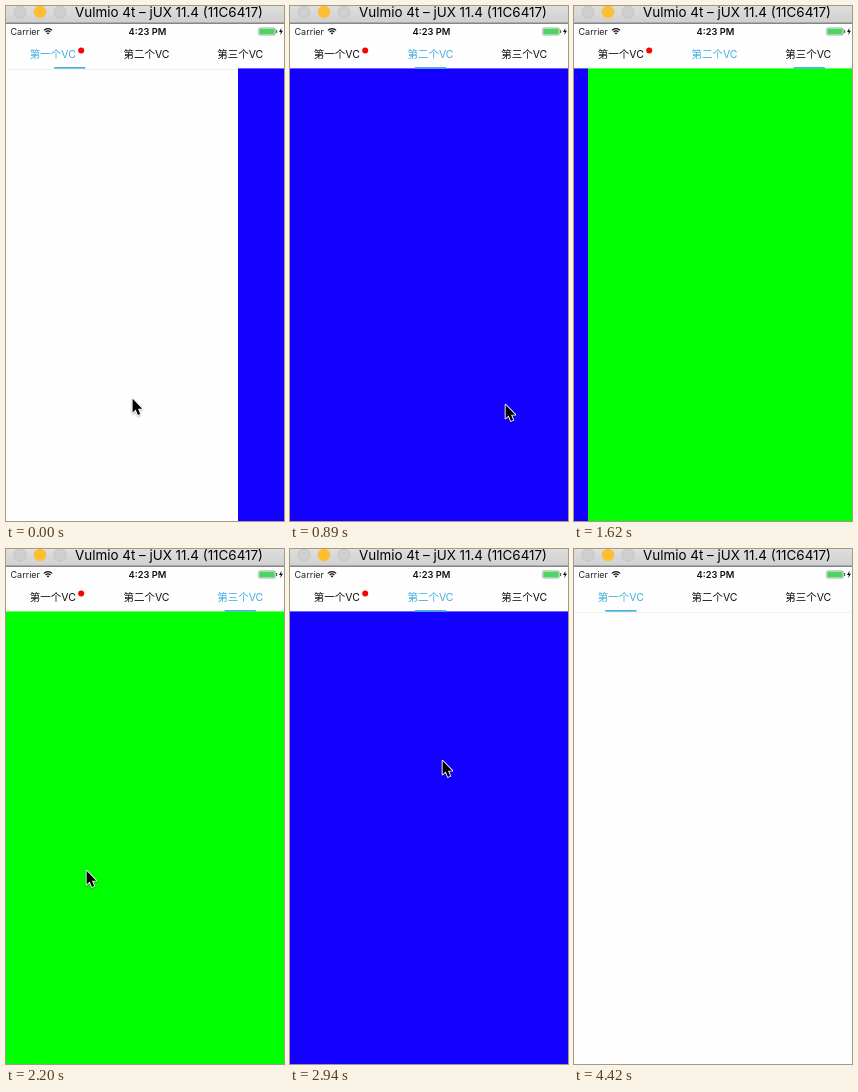
Recreate the animation shown at these times as an HTML page with a canvas. Size 278 by 515 pixels, loop 5020 ms.

```html
<!DOCTYPE html>
<html lang="zh">
<head>
<meta charset="utf-8">
<title>Tab pager</title>
<style>
  html, body { margin: 0; width: 100%; height: 100%; overflow: hidden; background: #fff; }
  canvas { display: block; }
</style>
</head>
<body>
<canvas id="stage" width="278" height="515"></canvas>
<script>
const ctx = document.getElementById('stage').getContext('2d');
const W = 278, H = 515, LOOP = 5020, TICK = 146.8, LAST = 30;
const PAGE = 281, TOP = 62.4, TAB = PAGE / 3;
const FONT = 'Inter, "Noto Sans CJK SC", "Noto Sans CJK", "Noto Sans CJK JP", sans-serif';
const TABS = ['第一个VC', '第二个VC', '第三个VC'];
const PAGES = ['#fefefe', '#1400ff', '#00ff00'];

// Each swipe: first tick, start page, direction, progress of page and of bar per tick
const SWIPES = [
  { at: 0, from: 0, dir: 1, page: [.174, .66, .961], bar: [.18, .74, 1.02] },
  { at: 9, from: 1, dir: 1, page: [.121, .6, .95], bar: [.128, .68, 1.01] },
  { at: 16, from: 2, dir: -1, page: [.14, .62, .95], bar: [.16, .7, 1.01] },
  { at: 22, from: 1, dir: -1, page: [.14, .6, .915], bar: [.16, .7, .98] }
];
const SETTLE = 3;

// Runs of pointer positions: first tick, then tip points
const POINTER = [
  { at: 0, pts: [[126, 392], [36, 386]] },
  { at: 5, pts: [[150, 392], [215, 398], [244, 402], [232, 402], [143, 401], [30, 394]] },
  { at: 13, pts: [[28, 370], [62, 340], [80, 321], [130, 300], [240, 280]] },
  { at: 19, pts: [[215, 235], [152, 211], [90, 225], [150, 232], [250, 240]] },
  { at: 27, pts: [[220, 392], [220, 392], [237, 431]] }
];

function poseAt(tick) {
  const s = SWIPES.filter(w => w.at <= tick).pop();
  const i = tick - s.at, done = i >= SETTLE;
  const place = list => (s.from + s.dir * (done ? 1 : list[i])) * PAGE;
  return { page: place(s.page), bar: place(s.bar), tab: done ? s.from + s.dir : s.from };
}

function pointerAt(tick) {
  const run = POINTER.filter(r => r.at <= tick).pop();
  return run.pts[tick - run.at];
}

function rect(x, y, w, h, color) {
  ctx.fillStyle = color;
  ctx.fillRect(x, y, w, h);
}

function disc(x, y, r, color, edge) {
  ctx.beginPath();
  ctx.arc(x, y, r, 0, Math.PI * 2);
  ctx.fillStyle = color;
  ctx.fill();
  if (edge) {
    ctx.strokeStyle = edge;
    ctx.lineWidth = .7;
    ctx.stroke();
  }
}

function text(str, x, y, font, color = '#111', align = 'center') {
  ctx.font = font + ' ' + FONT;
  ctx.textAlign = align;
  ctx.fillStyle = color;
  ctx.fillText(str, x, y);
}

function poly(points, x, y) {
  ctx.beginPath();
  points.forEach(([px, py]) => ctx.lineTo(x + px, y + py));
  ctx.closePath();
}

function titleBar() {
  const g = ctx.createLinearGradient(0, 0, 0, 17);
  g.addColorStop(0, '#dedede');
  g.addColorStop(1, '#d0d0d0');
  rect(0, 0, W, 17, g);
  rect(0, 16.7, W, 1, '#555');
  disc(14, 6, 6, '#cfcfcf', '#bcbcbc');
  disc(34, 6, 6.2, '#fdbe2f');
  disc(54, 6, 6, '#cfcfcf', '#bcbcbc');
  text('Vulmio 4t – jUX 11.4 (11C6417)', 163, 11, '13.4px', '#000');
}

function wifi(x, y) {
  ctx.strokeStyle = '#111';
  ctx.lineWidth = 1.3;
  for (const r of [3.4, 5.8]) {
    ctx.beginPath();
    ctx.arc(x, y, r, -Math.PI * .75, -Math.PI * .25);
    ctx.stroke();
  }
  ctx.beginPath();
  ctx.moveTo(x, y);
  ctx.arc(x, y, 1.9, -Math.PI * .75, -Math.PI * .25);
  ctx.fillStyle = '#111';
  ctx.fill();
}

function statusBar() {
  text('Carrier', 4.5, 28.5, '9px', '#222', 'left');
  wifi(42, 28.5);
  text('4:23 PM', 141.5, 28.5, '600 9.3px');
  ctx.beginPath();
  ctx.roundRect(252.5, 21.8, 17, 7.4, 1.5);
  ctx.fillStyle = '#fff';
  ctx.fill();
  ctx.strokeStyle = '#999';
  ctx.lineWidth = .6;
  ctx.stroke();
  rect(253.3, 22.5, 15.4, 6, '#4cd464');
  rect(270, 24, 1.2, 3, '#666');
  poly([[2.4, 0], [0, 4], [1.8, 4], [1.2, 7], [4, 2.8], [2.2, 2.8]], 273, 22);
  ctx.fillStyle = '#111';
  ctx.fill();
}

function arrow(x, y) {
  ctx.save();
  ctx.shadowColor = 'rgba(0,0,0,.3)';
  ctx.shadowBlur = 2;
  ctx.shadowOffsetY = 1;
  poly([[0, 0], [0, 13.6], [3.1, 10.8], [5.3, 16.2], [7.6, 15.2], [5.4, 9.9], [9.6, 9.9]], x + .6, y + .8);
  ctx.strokeStyle = '#fff';
  ctx.lineWidth = 1.8;
  ctx.lineJoin = 'round';
  ctx.stroke();
  ctx.restore();
  ctx.fillStyle = '#000';
  ctx.fill();
}

function draw(tick) {
  const pose = poseAt(tick);
  rect(0, 0, W, H, '#fefefe');
  rect(0, 63, W, 1, '#f1f1f1');
  PAGES.forEach((color, i) => {
    if (i) rect(Math.round(i * PAGE - pose.page), TOP, PAGE, H - TOP, color);
  });
  titleBar();
  statusBar();
  TABS.forEach((name, i) => {
    text(name, TAB * (i + .5), 51.5, '10.5px', i === pose.tab ? '#43ade0' : '#111');
  });
  rect(31.2 + pose.bar / 3, 61, 31.3, 1.7, '#4cb2dc');
  if (tick < 25) disc(75.2, 44.5, 3, '#ff0000');
  const tip = pointerAt(tick);
  if (tip) arrow(tip[0], tip[1]);
}

let start;
function loop(now) {
  if (start === undefined) start = now;
  const t = (now - start) % LOOP;
  draw(Math.min(LAST, Math.floor((t + 6) / TICK)));
  requestAnimationFrame(loop);
}
requestAnimationFrame(loop);
</script>
</body>
</html>
```
